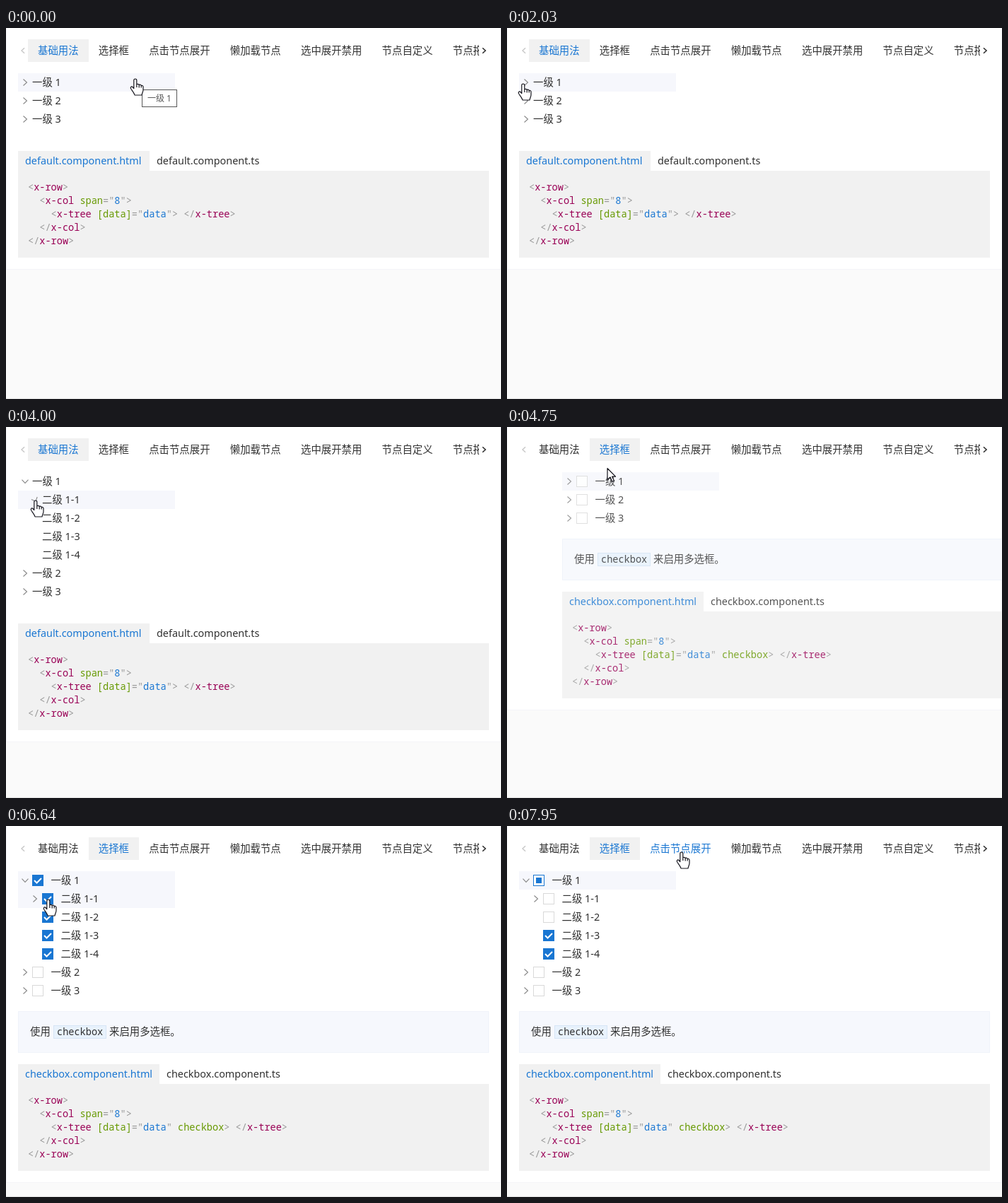
Recreate the animation shown at these times as an HTML page with a canvas. Size 700 px wide and 525 px high, loop 8000 ms.

```html
<!DOCTYPE html>
<html lang="zh-CN">
<head>
<meta charset="utf-8">
<title>Tree</title>
<style>
  html, body { margin: 0; width: 100%; height: 100%; overflow: hidden; background: #fafafa; }
  canvas { display: block; }
</style>
</head>
<body>
<canvas id="stage" width="700" height="525"></canvas>
<script>
const LOOP = 8000;
const ctx = document.getElementById('stage').getContext('2d');
const FAMILY = '"Noto Sans", "Noto Sans CJK SC", "Noto Sans CJK", sans-serif';
const SANS = '14.4px ' + FAMILY, SMALL = '12px ' + FAMILY;
const MONO = '13.6px "Noto Sans Mono", "DejaVu Sans Mono", monospace';
const INK = '#303030', BLUE = '#1976d2', GREY = '#f1f1f1';
const LEFT = 17, TOP = 64, ROW = 26, INDENT = 14, WIDTH = 666;

// Moments of the clicks
const OPEN_ROOT = 2190, OPEN_CHILD = 3300, CLOSE_CHILD = 4000, SWITCH = 4531,
  OPEN_CHECK = 5620, CHECK_ALL = 6100, UNCHECK_FIRST = 6860, UNCHECK_SECOND = 7330;

const TABS = ['基础用法', '选择框', '点击节点展开', '懒加载节点', '选中展开禁用', '节点自定义', '节点拖拽'];

// Where the pointer tip rests, with its arrival time
const STOPS = [
  { at: 0, x: 183, y: 72 },
  { at: 860, x: 173, y: 78 },
  { at: 1650, x: 23, y: 79 },
  { at: 2810, x: 32, y: 104 },
  { at: 3140, x: 42, y: 104 },
  { at: 4420, x: 144, y: 36 },
  { at: 4740, x: 142, y: 59 },
  { at: 5470, x: 32, y: 77 },
  { at: 5950, x: 46, y: 80 },
  { at: 6630, x: 60, y: 104 },
  { at: 7180, x: 60, y: 130 },
  { at: 7660, x: 70, y: 36 },
  { at: 7940, x: 247, y: 37 }
];

const HAND = new Path2D('M-2.2 2.5C-2.2-.2 1.8-.2 1.8 2.5V9C1.8 7.4 5 7.4 5.2 9.3C5.6 8.2 8 8.4 8.2 10.3' +
  'C9 9.4 11 10 11 11.8V16C11 19 9.5 20 9 23.5H-1C-1.5 21-3.5 18.5-6 15C-8 12-5.5 10.5-4 12L-2.2 14Z' +
  'M-2.2 2.5V14M1.8 9V12.5M5.2 9.3V13M8.2 10.3V13');
const ARROW = new Path2D('M0 0V16L4 12.5L6.8 18.8L9.4 17.6L6.6 11.7H11.5Z');

const clamp = v => Math.min(1, Math.max(0, v));
const smooth = p => p * p * (3 - 2 * p);

// Longer ways take longer
function pointerAt(t) {
  let { x, y } = STOPS[0];
  for (const stop of STOPS) {
    const dx = stop.x - x, dy = stop.y - y;
    const p = smooth(clamp(1 + (t - stop.at) / (100 + Math.hypot(dx, dy))));
    x += dx * p;
    y += dy * p;
  }
  return { x, y };
}

// The highlight lingers, and the first row reaches a little above its edge
function hoveredRows(t) {
  return [t, t - 360].map(pointerAt)
    .filter(({ y }) => y > TOP - 8)
    .map(({ y }) => Math.max(0, Math.floor((y - TOP) / ROW)));
}

function box(x, y, w, h, fill, border) {
  ctx.fillStyle = fill;
  ctx.fillRect(x, y, w, h);
  if (!border) return;
  ctx.strokeStyle = border;
  ctx.lineWidth = 1;
  ctx.strokeRect(x + .5, y + .5, w - 1, h - 1);
}

function text(str, x, y, color = INK, font = SANS) {
  ctx.font = font;
  ctx.fillStyle = color;
  ctx.fillText(str, x, y);
}

function line(points, color, width) {
  ctx.beginPath();
  points.forEach(([x, y]) => ctx.lineTo(x, y));
  ctx.strokeStyle = color;
  ctx.lineWidth = width;
  ctx.stroke();
}

function chevron(x, y, turn, color = '#888', size = 4.5, width = 1.1) {
  ctx.save();
  ctx.translate(x, y);
  ctx.rotate(turn * Math.PI / 2);
  line([[-size * .55, -size], [size * .55, 0], [-size * .55, size]], color, width);
  ctx.restore();
}

function checkbox(x, y, state) {
  box(x, y, 16, 16, state === 'on' ? BLUE : '#fff', state ? BLUE : '#d9d9d9');
  if (state === 'on') line([[x + 3, y + 8], [x + 6.5, y + 11.5], [x + 13, y + 5]], '#fff', 2);
  if (state === 'some') box(x + 4, y + 4, 8, 8, BLUE);
}

function drawTabs(pointer, active) {
  ctx.save();
  ctx.beginPath();
  ctx.rect(0, 0, 669, 60);
  ctx.clip();
  let x = 31;
  TABS.forEach((label, i) => {
    const w = label.length * 14.4 + 28.2;
    const over = Math.abs(pointer.y - 32) < 16 && pointer.x > x && pointer.x < x + w;
    if (i === active) box(Math.round(x), 16, Math.round(w), 32, GREY);
    text(label, x + 14, 37, i === active || over ? BLUE : INK);
    x += w;
  });
  ctx.restore();
  chevron(24, 32, 2, '#c4c4c4', 3.8, 1.2);
  chevron(676, 32, 0, '#222', 3.8, 1.4);
}

function treeRows(t, boxes) {
  const turned = time => clamp((t - time + 50) / 200);
  const openRoot = boxes ? OPEN_CHECK : OPEN_ROOT;
  const all = boxes && t >= CHECK_ALL;
  const unchecks = [UNCHECK_FIRST, UNCHECK_SECOND];

  const root = { level: 0, label: '一级 1', turn: turned(openRoot), state: all && 'on' };
  if (all && t >= UNCHECK_FIRST) root.state = 'some';
  const rows = [root];
  if (t >= openRoot) {
    for (let i = 1; i <= 4; i++)
      rows.push({ level: 1, label: '二级 1-' + i, state: all && !(t >= unchecks[i - 1]) && 'on' });
    rows[1].turn = boxes ? 0 : turned(OPEN_CHILD) - turned(CLOSE_CHILD);
  }
  if (!boxes && t >= OPEN_CHILD && t < CLOSE_CHILD) {
    for (let i = 1; i <= 4; i++) rows.splice(1 + i, 0, { level: 2, label: '三级 1-1-' + i });
  }
  for (const n of [2, 3]) rows.push({ level: 0, label: '一级 ' + n, turn: 0 });
  return rows;
}

function drawTree(rows, x, hovered, boxes) {
  rows.forEach(({ level, label, turn, state }, i) => {
    const y = TOP + ROW * i, left = x + INDENT * level;
    if (hovered.includes(i)) box(x, y, 222, ROW, '#f6f7fc');
    if (turn !== undefined) chevron(left + 10, y + 13, turn);
    if (boxes) checkbox(left + 20, y + 5, state);
    text(label, left + (boxes ? 46.5 : 20), y + 18);
  });
}

function drawNote(x, y) {
  box(x, y, WIDTH, 59, '#f6f8fd', '#f0f3fa');
  text('使用', x + 17, y + 34);
  box(x + 50, y + 20, 75, 19, '#e8f2fd', '#d6e5f5');
  text('checkbox', x + 55, y + 34, INK, MONO);
  text('来启用多选框。', x + 129, y + 34);
}

function drawCode(x, y, name, tabWidth, attribute) {
  box(x, y, tabWidth, 28, GREY);
  text(name + '.component.html', x + 10, y + 19, BLUE);
  text(name + '.component.ts', x + tabWidth + 10, y + 19);
  box(x, y + 28, WIDTH, 123, GREY);

  // Token kinds: punctuation, tag, value, attribute
  const token = /(<\/?|[>="])|((?<=<\/?)[\w-]+)|((?<=")\w+(?="))|([\[\]\w]+)/g;
  const colors = ['#999', '#905', BLUE, '#690'];
  const source = `<x-row>
  <x-col span="8">
    <x-tree [data]="data"${attribute}> </x-tree>
  </x-col>
</x-row>`;
  ctx.font = MONO;
  const advance = ctx.measureText('0').width;
  source.split('\n').forEach((code, i) => {
    for (const m of code.matchAll(token)) {
      const kind = m.slice(1).findIndex(Boolean);
      text(m[0], x + 14 + m.index * advance, y + 56 + 19 * i, colors[kind], MONO);
    }
  });
}

function drawPointer({ x, y }) {
  const plain = y > 52 && y < 66 && x > 120;
  const shape = plain ? ARROW : HAND;
  ctx.save();
  ctx.translate(x, y - .5);
  ctx.fillStyle = '#fff';
  ctx.strokeStyle = '#14141c';
  ctx.lineWidth = 1.2;
  ctx.lineJoin = 'round';
  ctx.fill(shape);
  ctx.stroke(shape);
  ctx.restore();
}

function draw(t) {
  const second = t >= SWITCH;
  const pointer = pointerAt(t);
  const rows = treeRows(t, second);
  const slide = second ? (1 - clamp((t - SWITCH) / 400)) ** 3 : 0;
  const x = LEFT + Math.round(WIDTH * slide);
  const treeEnd = TOP + ROW * rows.length;
  const codeTop = treeEnd + (second ? 91 : 32);

  box(0, 0, 700, 525, '#fafafa');
  box(0, -1, 700, codeTop + 169, '#fff', '#f4f4f8');
  drawTabs(pointer, second ? 1 : 0);

  ctx.globalAlpha = clamp(1 - 2 * slide);
  drawTree(rows, x, hoveredRows(t), second);
  if (second) {
    drawNote(x, treeEnd + 16);
    drawCode(x, codeTop, 'checkbox', 200, ' checkbox');
  } else {
    drawCode(x, codeTop, 'default', 186, '');
  }
  ctx.globalAlpha = 1;
  box(0, 524, 700, 1, '#e4e4e4');

  if (t < 330) {
    box(192, 87, 50, 25, '#fff', '#575757');
    text('一级 1', 200, 104, '#575757', SMALL);
  }
  drawPointer(pointer);
}

function tick() {
  draw(performance.now() % LOOP);
  requestAnimationFrame(tick);
}
tick();
</script>
</body>
</html>
```
